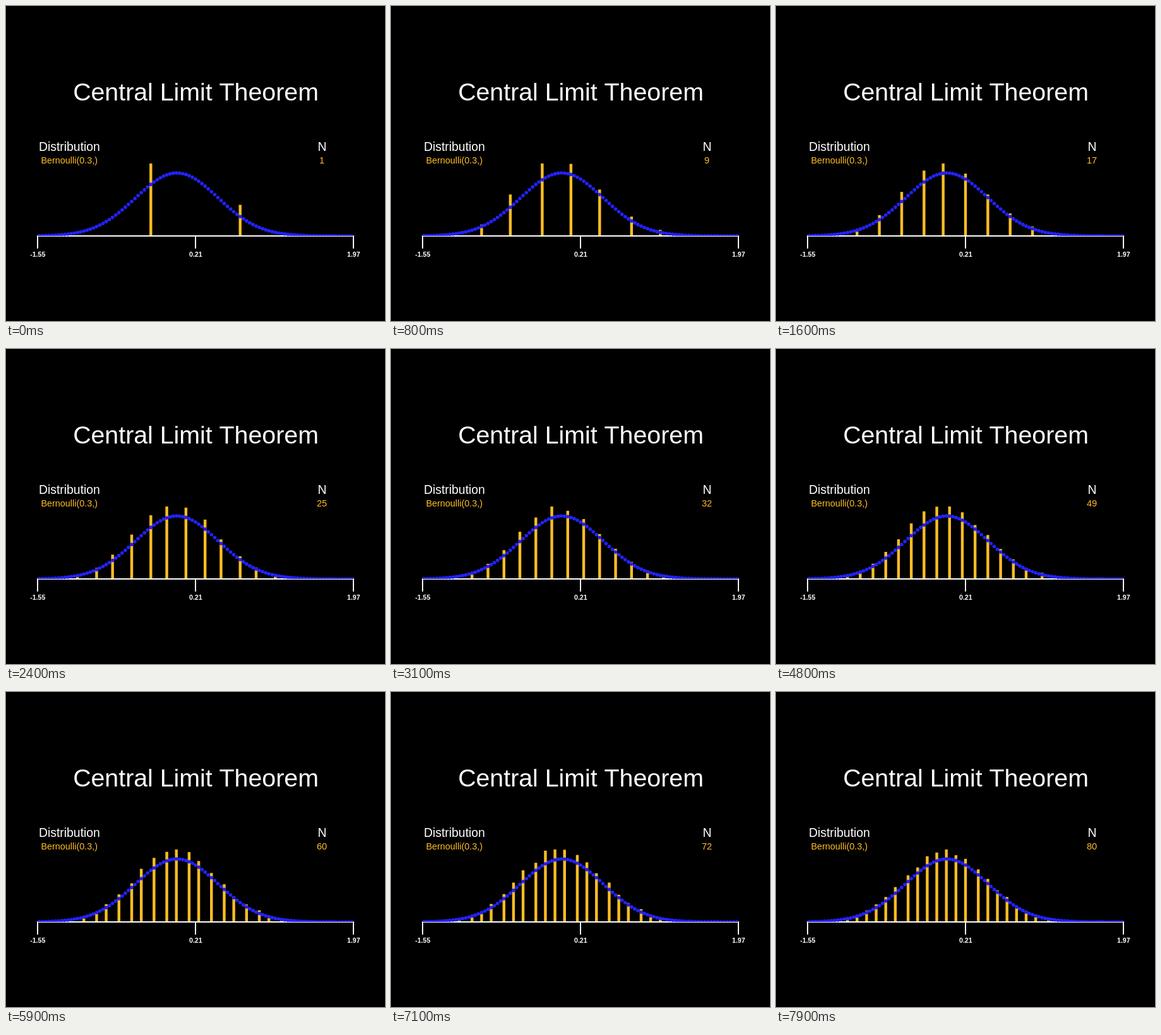
Write an HTML page with a canvas that moves like this. It is 600 px wide and 500 px high and loops after 8 s.

```html
<!DOCTYPE html>
<html lang="en">
<head>
<meta charset="utf-8">
<title>Central Limit Theorem</title>
<style>
html, body { margin: 0; width: 100%; height: 100%; overflow: hidden; background: #000; }
canvas { display: block; }
</style>
</head>
<body>
<canvas id="stage" width="600" height="500"></canvas>
<script>
const ctx = document.getElementById('stage').getContext('2d');
const GOLD = '#ffbe23', BLUE = '#2222ff', WHITE = '#fff';
const P = 0.3, STEP = 100, LOOP = 8000, TRIALS = 30000;
const LEFT = 50, WIDTH = 500, BASE = 365, BINS = 99;
const BAR_PEAK = 115, CURVE_PEAK = 100, BAR = 4.4, DOT = 2.8;
const LOW = -1.5517, SCALE = 28.14; // axis start, bins per unit
const BIN = WIDTH / BINS;

function random(seed) {
  let s = seed >>> 0;
  return () => {
    s = (s + 0x6d2b79f5) >>> 0;
    let r = Math.imul(s ^ (s >>> 15), s | 1);
    r ^= r + Math.imul(r ^ (r >>> 7), r | 61);
    return ((r ^ (r >>> 14)) >>> 0) / 4294967296;
  };
}

// Histogram of the scaled mean of n Bernoulli draws, with sampling noise.
function histogram(n) {
  const rnd = random(n * 7919);
  const freq = [];
  let p = Math.pow(1 - P, n);
  for (let k = 0; k <= n; k++) {
    const noise = (rnd() + rnd() + rnd() - 1.5) * 2;
    freq.push(Math.max(0, p + noise * Math.sqrt(p * (1 - p) / TRIALS)));
    p *= (n - k) / (k + 1) * P / (1 - P);
  }
  const top = Math.max(...freq);
  return freq.map((f, k) => ({
    bin: Math.floor(((k - n * P) / Math.sqrt(n) - LOW) * SCALE),
    height: f / top * BAR_PEAK
  }));
}

const binX = i => LEFT + (i + 0.5) * BIN;

function drawBars(n) {
  ctx.fillStyle = GOLD;
  for (const { bin, height } of histogram(n)) {
    if (bin < 0 || bin >= BINS) continue;
    ctx.fillRect(binX(bin) - BAR / 2, BASE - height, BAR, height);
  }
}

function drawCurve() {
  const mean = LEFT - LOW * SCALE * BIN;
  const sd = Math.sqrt(P * (1 - P)) * SCALE * BIN;
  ctx.save();
  ctx.beginPath();
  ctx.rect(LEFT, 0, WIDTH, BASE);
  ctx.clip();
  ctx.fillStyle = BLUE;
  for (let i = 0; i < BINS; i++) {
    const x = binX(i), z = (x - mean) / sd;
    ctx.beginPath();
    ctx.arc(x, BASE - CURVE_PEAK * Math.exp(-z * z / 2), DOT, 0, 2 * Math.PI);
    ctx.fill();
  }
  ctx.restore();
}

function text(str, x, y, size, color, weight = '') {
  ctx.font = `${weight} ${size}px "Liberation Sans", Arial, sans-serif`;
  ctx.fillStyle = color;
  ctx.textAlign = 'center';
  ctx.fillText(str, x, y);
}

function drawAxis() {
  ctx.fillStyle = WHITE;
  ctx.fillRect(LEFT - 1, BASE - 1, WIDTH + 2, 2);
  ['-1.55', '0.21', '1.97'].forEach((label, i) => {
    const x = LEFT + i * WIDTH / 2;
    ctx.fillRect(x - 1, BASE, 2, 20);
    text(label, x + 0.3, 398, 10.6, WHITE, 'bold');
  });
}

function draw(ms) {
  const n = 1 + Math.floor((ms % LOOP) / STEP);
  ctx.fillStyle = '#000';
  ctx.fillRect(0, 0, 600, 500);
  text('Central Limit Theorem', 300.5, 150, 39.3, WHITE);
  text('Distribution', 100.4, 230, 19.4, WHITE);
  text('N', 500.4, 230, 19.4, WHITE);
  text('Bernoulli(0.3,)', 100.2, 250, 14.4, GOLD);
  text(String(n), 500, 250, 14.6, GOLD);
  drawBars(n);
  drawAxis();
  drawCurve();
}

const start = performance.now();
function tick() {
  draw(Math.max(0, performance.now() - start));
  requestAnimationFrame(tick);
}
tick();
</script>
</body>
</html>
```
